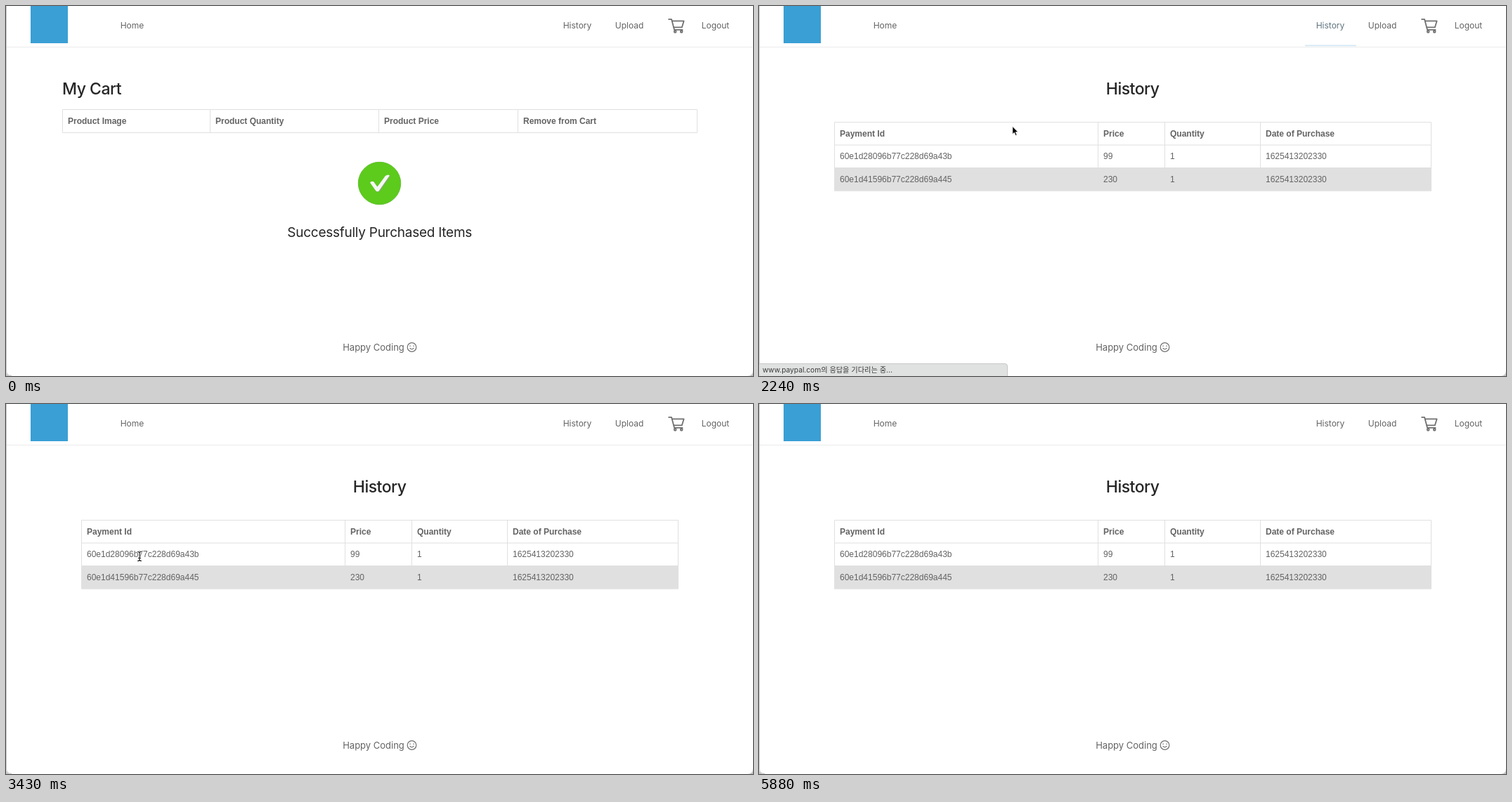
Animation, 1063 px wide and 527 px high, one loop 5950 ms. Source, as an HTML page:

```html
<!DOCTYPE html>
<html lang="en">
<head>
<meta charset="utf-8">
<title>Purchase history</title>
<style>
html, body { margin: 0; width: 100%; height: 100%; overflow: hidden; background: #c4c4c4; }
svg { display: block; width: 1063px; height: 527px; }
text { font-family: Inter, "Noto Sans CJK KR", "Noto Sans CJK", sans-serif; fill: #636363; white-space: pre; }
.mid { text-anchor: middle; }
.nav { font-size: 12px; }
.title { font-size: 23px; font-weight: 500; letter-spacing: -.5px; fill: #262626; }
.done { font-size: 19px; letter-spacing: -.26px; fill: #262626; }
.foot { font-size: 13px; }
.cell { font: 12px "Liberation Sans", Arial, sans-serif; }
.head { font-weight: bold; }
.tip { font-size: 10.2px; fill: #3c3c3c; }
.grid { fill: none; stroke: #e0e0e0; }
.line { fill: none; stroke: #707070; }
.tipbox { fill: #e0e1e1; stroke: #c8c8c8; }
</style>
</head>
<body>
<svg viewBox="0 0 1063 527">
  <defs>
    <path id="tick" d="M518 251.5Q520 249 523.2 250.2L528.4 257.6 539.8 242Q543 239.4 546 241.2L531 263Q528.8 265.5 526.3 263.2Z"/>
    <path id="ibeam" d="M-2.5 -6.5Q0 -6.5 0 -4.5Q0 -6.5 2.5 -6.5M0 -4.5V4.5M-2.5 6.5Q0 6.5 0 4.5Q0 6.5 2.5 6.5M-1.5 2.5H1.5"/>
  </defs>
  <path d="M0 0V519Q0 527 8 527H1055Q1063 527 1063 519V0Z" fill="#fff"/>
  <path d="M.5 0V519Q.5 526.5 8 526.5" fill="none" stroke="#c6c6c6"/>
  <path d="M1 58.5H1062" stroke="#ebebeb"/>
  <rect x="35" y="0" width="53" height="53" fill="#3a9fd5"/>

  <g class="nav mid">
    <text x="179.5" y="32">Home</text>
    <text x="813" y="32" id="link">History</text>
    <text x="887" y="32">Upload</text>
    <text x="1009.5" y="32">Logout</text>
  </g>
  <rect id="bar" x="777" y="55.5" width="73" height="1.7" fill="#4ba0d3"/>
  <g class="line" stroke-width="1.8" stroke-linejoin="round" stroke-linecap="round" transform="translate(-.4 -.6)">
    <path d="M943.5 19.5H947.5L951.5 34.5H963"/>
    <path d="M948.4 22H965L962.2 31H950.8"/>
    <circle cx="952.6" cy="37" r="1.4"/>
    <circle cx="961.6" cy="37" r="1.4"/>
  </g>

  <g id="cart">
    <text class="title" x="80" y="126">My Cart</text>
    <g id="cartTable"></g>
    <circle cx="531.5" cy="252.5" r="30.2" fill="#5ccb1c" stroke="#63c02f"/>
    <use href="#tick" fill="#84a870" x="1" y="1"/>
    <use href="#tick" fill="#f5f7f4"/>
    <text class="done mid" x="531.7" y="329">Successfully Purchased Items</text>
  </g>

  <g id="history">
    <text class="title mid" x="531.7" y="126">History</text>
    <rect x="107" y="230.5" width="850" height="33" fill="#e0e0e0"/>
    <g id="historyTable"></g>
  </g>

  <text class="foot mid" x="523" y="491">Happy Coding</text>
  <g class="line" stroke-width="1.2" stroke-linecap="round">
    <circle cx="577.5" cy="486" r="6.3"/>
    <path d="M575 487.4Q577.5 490.6 580 487.4"/>
    <path d="M575 484.2h.1M580 484.2h.1" stroke-width="1.6"/>
  </g>

  <g id="linkTip">
    <path class="tipbox" d="M0 509.5H117Q120.5 509.5 120.5 513V527.5H0Z"/>
    <text class="tip" x="5" y="522">localhost:3000/history</text>
  </g>
  <g id="waitTip">
    <path class="tipbox" d="M0 509.5H350Q353.5 509.5 353.5 513V527.5H0Z"/>
    <text class="tip" x="5" y="522" lang="ko">www.paypal.com의 응답을 기다리는 중...</text>
  </g>

  <g id="cursor">
    <path id="arrow" d="M0 0V11.4L2.6 9 4.4 13.2 6.4 12.4 4.6 8.3H8.2Z" fill="#000" stroke="#fff" stroke-width=".9"/>
    <g id="hand" stroke="#222" stroke-linejoin="round">
      <path d="M-1.7 1.2Q-.4 -1 .9 1L2 5.2Q3.3 4.2 4.2 5.3Q5.4 4.6 6.1 5.9Q7.3 5.6 7.6 7.2L7.2 10.8 6.2 13.6H.4L-2.9 9.4Q-4 7.3 -1.5 7.2L-.4 8Z" fill="#fff"/>
      <path d="M2.2 8.6V11.4M4.2 8.6V11.4" stroke-width=".7"/>
    </g>
    <g id="beam" fill="none" stroke-linecap="round">
      <use href="#ibeam" stroke="#fff" stroke-width="2.4"/>
      <use href="#ibeam" stroke="#111" stroke-width="1.1"/>
    </g>
  </g>
</svg>
<script>
const LOOP = 5950, STEP = 70;
const $ = id => document.getElementById(id);
const show = (id, on) => { $(id).style.display = on ? '' : 'none'; };
const clamp = v => Math.max(0, Math.min(1, v));

// xs: column edges, ys: row edges, rows: cell text by row
function table(id, xs, ys, rows) {
  const [l, r] = [xs[0], xs[xs.length - 1]], [t, b] = [ys[0], ys[ys.length - 1]];
  let out = `<path class="grid" d="${xs.map(x => `M${x} ${t}V${b}`).join('')}${ys.map(y => `M${l} ${y}H${r}`).join('')}"/>`;
  rows.forEach((row, j) => row.forEach((s, i) => {
    out += `<text class="cell${j ? '' : ' head'}" x="${xs[i] + 7.5}" y="${ys[j] + 20}">${s}</text>`;
  }));
  $(id).innerHTML = out;
}
table('cartTable', [80.5, 290.5, 530.5, 728.5, 983.5], [147.5, 180.5],
  [['Product Image', 'Product Quantity', 'Product Price', 'Remove from Cart']]);
table('historyTable', [107.5, 482.5, 577.5, 713.5, 956.5], [165.5, 198, 230.5, 263], [
  ['Payment Id', 'Price', 'Quantity', 'Date of Purchase'],
  ['60e1d28096b77c228d69a43b', '99', '1', '1625413202330'],
  ['60e1d41596b77c228d69a445', '230', '1', '1625413202330']
]);

// time, x, y of the pointer
const path = [
  [560, 1066, 96], [770, 905, 78], [980, 819, 56], [1050, 819, 52], [1190, 819, 28], [1960, 819, 28],
  [2310, 307.5, 188], [2870, 226, 224], [3220, 190, 217], [3430, 190, 217], [3710, 721, 219],
  [3920, 655, 222], [4200, 590, 272], [4550, 682, 222], [4760, 699, 198],
  [4900, 733, 262], [5180, 655, 415], [5600, 562, 530]
];

function pointer(t) {
  const i = path.findIndex(p => p[0] > t);
  if (i < 1) return null;
  const [t0, x0, y0] = path[i - 1], [t1, x1, y1] = path[i];
  const u = (t - t0) / (t1 - t0), k = u * u * (3 - 2 * u);
  return [x0 + (x1 - x0) * k, y0 + (y1 - y0) * k];
}

const hoverAt = t => clamp(Math.min((t - 1050) / 280, (2310 - t) / 280));
const blend = (a, b, k) => `rgb(${a.map((v, i) => Math.round(v + (b[i] - v) * k))})`;

function draw(now) {
  const t = Math.floor(now % LOOP / STEP) * STEP;
  const late = t >= 2030, hover = hoverAt(t);
  show('cart', !late);
  show('history', late);
  $('link').style.fill = blend([99, 99, 99], [92, 166, 209], hover);
  $('bar').style.opacity = hover;
  show('linkTip', t >= 1190 && t < 2170);
  show('waitTip', t >= 2170 && t < 2660);

  const p = pointer(t);
  show('cursor', p);
  if (p) $('cursor').setAttribute('transform', `translate(${p[0].toFixed(2)} ${p[1].toFixed(2)})`);
  const hand = t >= 1120 && t < 2030, beam = t >= 2940 && t < 3500;
  show('hand', hand);
  show('beam', beam);
  show('arrow', !hand && !beam);
}

const start = performance.now();
function tick() {
  draw(performance.now() - start);
  requestAnimationFrame(tick);
}
tick();
</script>
</body>
</html>
```
